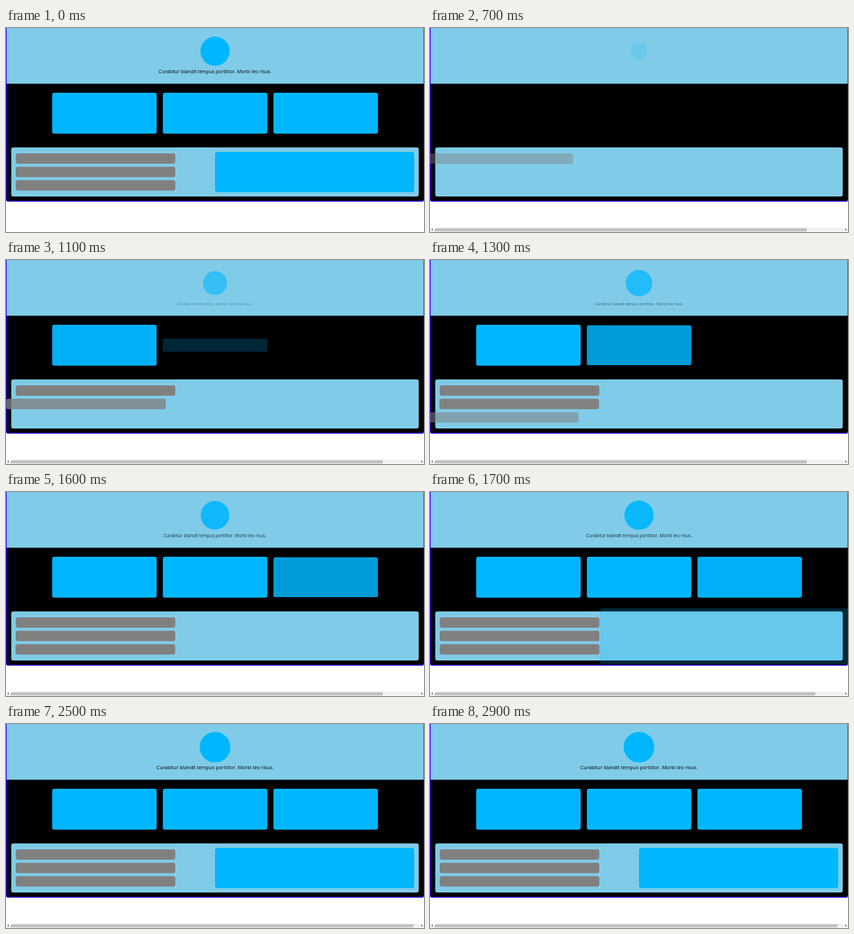
An HTML page with a canvas for the animation above (3 s loop, 600 by 293 pixels).

```html
<!DOCTYPE html>
<html lang="en">
<head>
<meta charset="utf-8">
<title>Staggered page entrance</title>
<style>
html, body { margin: 0; width: 100%; height: 100%; overflow: hidden; background: #fff; }
canvas { display: block; }
</style>
</head>
<body>
<canvas id="stage" width="600" height="293"></canvas>
<script>
const ctx = document.getElementById('stage').getContext('2d');
const LOOP = 3000, HOLD = 700, STEP = 100;
const SKY = '#80cce8', BLUE = '#00b7ff', GRAY = '#808080';

// The standard CSS "ease" curve, solved by bisection
function ease(x) {
  if (x <= 0) return 0;
  if (x >= 1) return 1;
  const bezier = (a, b, u) => 3 * a * u * (1 - u) ** 2 + 3 * b * u * u * (1 - u) + u ** 3;
  let lo = 0, hi = 1;
  for (let i = 0; i < 24; i++) {
    const mid = (lo + hi) / 2;
    if (bezier(0.25, 0.25, mid) < x) lo = mid; else hi = mid;
  }
  return bezier(0.1, 1, lo);
}

function box(x, y, w, h, color, radius = 0) {
  ctx.fillStyle = color;
  ctx.beginPath();
  ctx.roundRect(x, y, w, h, radius);
  ctx.fill();
}

// Draws a part around its own centre, scaled and faded
function part(cx, cy, sx, sy, alpha, paint) {
  if (alpha <= 0) return;
  ctx.save();
  ctx.globalAlpha = alpha;
  ctx.translate(cx, cy);
  ctx.scale(sx, sy);
  paint();
  ctx.restore();
}

function arrow(x, dir) {
  ctx.fillStyle = '#505050';
  ctx.beginPath();
  ctx.moveTo(x + dir, 289.8);
  ctx.lineTo(x - dir, 288.3);
  ctx.lineTo(x - dir, 291.3);
  ctx.fill();
}

function scrollbar(zoom) {
  const overflow = 443 + 143 * (1.5 - zoom / 2);
  const end = zoom === 1 ? 585 : 7 + 585 * 600 / Math.max(604, overflow);
  box(0, 287, 600, 5.5, '#f1f1f1');
  box(7, 287.4, end - 7, 4.8, '#c1c1c1');
  arrow(3, -1);
  arrow(597, 1);
}

function draw(time) {
  const resting = time < HOLD;
  const progress = (start, length = 500) => resting ? 1 : ease((time - start) / length);
  const grow = (p, max) => resting ? 1 : 0.5 + (max - 0.5) * p;

  box(0, 0, 600, 293, '#fff');
  box(0, -6, 600, 255.5, '#30f', 3);
  box(1, -6, 598.5, 254.3, '#000', 2);
  box(1, 0, 598.5, 80, SKY);
  box(7.5, 171.5, 585, 70.5, SKY, 3);

  const dot = progress(420, 2000), dotSize = grow(dot, 1.05);
  part(300, 33.3, dotSize, dotSize, dot, () => box(-21, -21, 42, 42, BLUE, 21));

  const title = progress(680, 2000), titleSize = grow(title, 1.04);
  part(300, 63, titleSize, titleSize, title, () => {
    ctx.fillStyle = '#000';
    ctx.font = '6.83px "Open Sans", "Noto Sans", sans-serif';
    ctx.textAlign = 'center';
    ctx.fillText('Curabitur blandit tempus porttitor. Morbi leo risus.', 0, 2.3);
  });

  for (let i = 0; i < 3; i++) {
    const flip = progress(720 + 300 * i);
    part(141.3 + 158.8 * i, 122.4, 1, Math.cos((1 - flip) * Math.PI / 2), flip,
      () => box(-75, -29.4, 150, 58.8, BLUE, 3));

    const slide = progress(570 + 285 * i);
    part(128.5 - 66 * (1 - slide), 187.5 + 19.2 * i, 1, 1, slide,
      () => box(-114.5, -7.5, 229, 15, GRAY, 3));
  }

  const zoom = progress(1620), zoomSize = 1.5 - zoom / 2;
  part(443, 206.9, zoomSize, zoomSize, zoom, () => box(-143, -28.8, 286, 57.6, BLUE, 3));

  if (!resting) scrollbar(zoom);
}

function tick() {
  const time = performance.now() % LOOP;
  draw(Math.floor(time / STEP) * STEP);
  requestAnimationFrame(tick);
}
tick();
</script>
</body>
</html>
```
